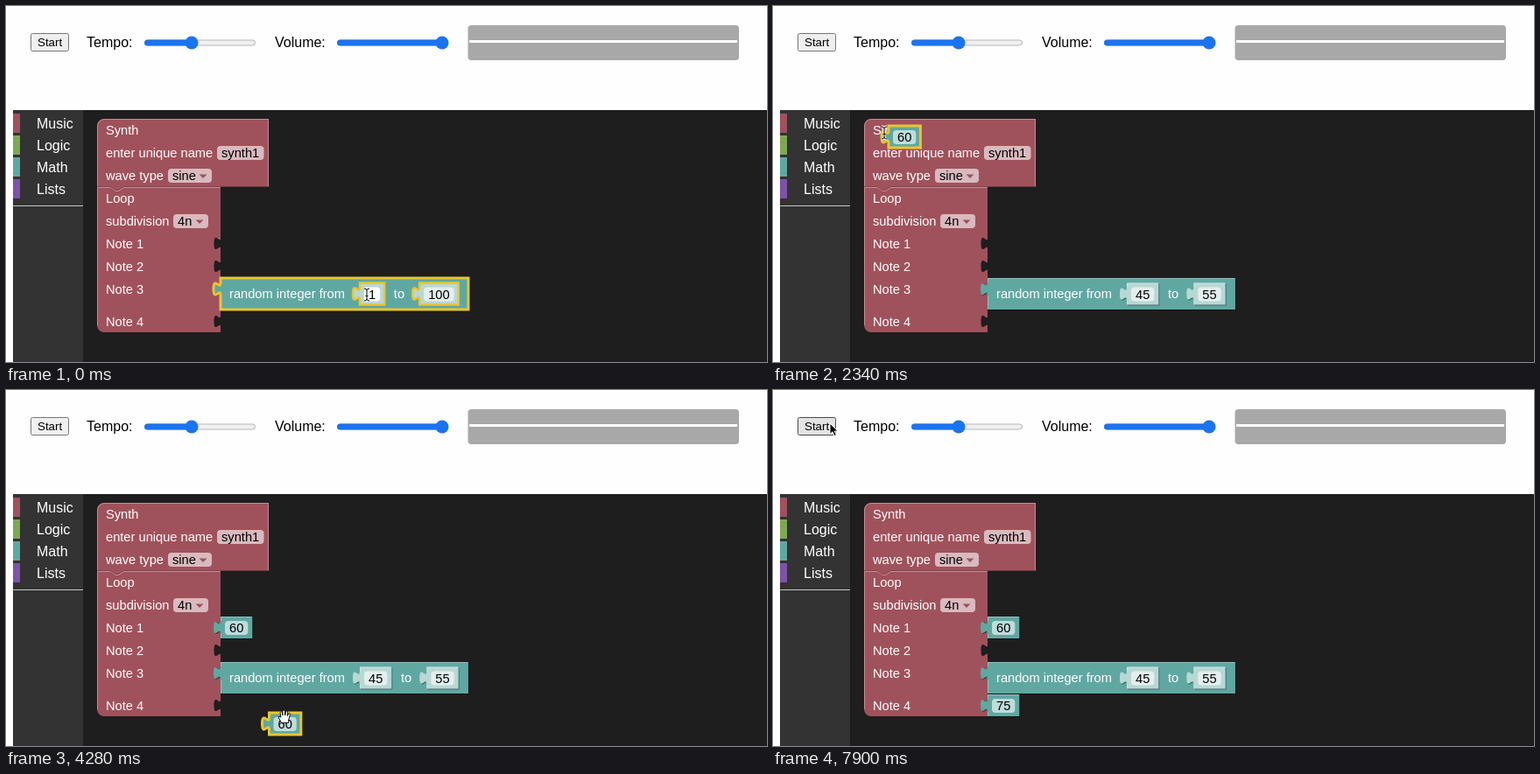
Recreate the animation shown at these times as an HTML page. Size 869 px wide and 407 px high, loop 8000 ms.

```html
<!DOCTYPE html>
<html lang="en">
<head>
<meta charset="utf-8">
<title>Music blocks</title>
<style>
  html, body { margin: 0; width: 100%; height: 100%; overflow: hidden; background: #fefefe; }
  svg { display: block; width: 869px; height: 407px; }
  text { font-family: "Liberation Sans", Arial, sans-serif; white-space: pre; }
</style>
</head>
<body>
<svg id="stage" viewBox="0 0 869 407" xmlns="http://www.w3.org/2000/svg"></svg>
<script>
const LOOP = 8000, TICKS = 82;
const RED = '#a0525c', TEAL = '#5fa8a2', PALE = '#b9d8d5', YELLOW = '#e9c52f';
const DARK = '#1e1e1e', BLUE = '#1a73f0';
const DIGIT = 8.16;
const TAB_DOWN = 'c0,10 -8,-8 -8,7.5 s8,-2.5 8,7.5';
const TAB_UP = 'c0,-10 -8,8 -8,-7.5 s8,2.5 8,-7.5';

// [tick, x, y, kind]
const cursorKeys = [
  [0, 412, 330, 'beam'], [9, 412, 330, 'beam'], [10, 395, 322, 'hand'], [11, 340, 300, 'arrow'],
  [13, 205, 240, 'hand'], [14, 130, 212, 'hand'], [15, 82, 194, 'arrow'], [16, 67, 190, 'arrow'],
  [18, 67, 188, 'arrow'], [20, 120, 160, 'arrow'], [21, 135, 150, 'arrow'],
  [22, 127, 145, 'beam'], [30, 127, 145, 'beam'], [31, 268, 275, 'hand'], [35, 268, 275, 'arrow'],
  [37, 300, 287, 'arrow'], [39, 304, 289, 'arrow'], [41, 312, 340, 'arrow'], [43, 318, 373, 'hand'],
  [45, 318, 373, 'hand'], [48, 298, 349, 'hand'], [50, 276, 329, 'hand'], [51, 271, 341, 'hand'],
  [52, 263, 352, 'hand'], [53, 290, 372, 'arrow'], [54, 312, 378, 'arrow'], [55, 285, 372, 'arrow'],
  [56, 270, 366, 'beam'], [73, 270, 366, 'beam'], [74, 272, 372, 'hand'], [75, 272, 372, 'hand'],
  [76, 295, 338, 'arrow'], [78, 415, 180, 'arrow'], [79, 300, 125, 'arrow'],
  [80, 150, 62, 'arrow'], [81, 65, 38, 'arrow']
];
// [tick, x, y] of the dragged number
const firstDrag = [[23, 104, 129], [25, 160, 145], [27, 305, 215], [28, 336, 238], [29, 300, 246], [30, 253.5, 247]];
const secondDrag = [[45, 300.5, 369], [48, 280, 345], [50, 258, 325], [51, 253, 337]];

function at(keys, n) {
  let i = 0;
  while (i < keys.length - 1 && keys[i + 1][0] <= n) i++;
  const a = keys[i], b = keys[i + 1] || a;
  const p = b === a ? 0 : Math.max(0, (n - a[0]) / (b[0] - a[0]));
  return { x: a[1] + (b[1] - a[1]) * p, y: a[2] + (b[2] - a[2]) * p, kind: a[3] };
}

const rect = (x, y, w, h, fill, extra = '') =>
  `<rect x="${x}" y="${y}" width="${w}" height="${h}" fill="${fill}" ${extra}/>`;
const path = (d, fill, extra = '') => `<path d="${d}" fill="${fill}" ${extra}/>`;
const label = (x, y, s, fill = '#fff', size = 14.67) =>
  `<text x="${x}" y="${y}" font-size="${size}" fill="${fill}">${s}</text>`;

function field(x, y, w, s, opts = {}) {
  let out = rect(x, y, w, 16, '#fff', `rx="4" fill-opacity="${opts.edit ? 1 : 0.6}"`);
  if (opts.select) out += rect(x + 4, y + 1, w - 8, 14, '#b3d4fc');
  out += label(x + 5, y + 13, s, '#000');
  if (opts.caret) out += rect(x + 5.5 + DIGIT * s.length, y + 1, 1, 14, '#000');
  if (opts.arrow) out += path(`M${x + w - 14.5},${y + 6.5} h9 l-4.5,4.5z`, opts.arrow);
  return out;
}

// Block with an output tab on its left side
function valueBlock(x, y, w, h, fill, selected, stroke = 3) {
  const d = `M${x},${y} h${w} v${h} h${-w} V${y + 20} ${TAB_UP} z`;
  if (selected) return path(d, fill, `stroke="${YELLOW}" stroke-width="${stroke}"`);
  return path(d, '#000', 'fill-opacity=".35" transform="translate(1 1)"') + path(d, fill) +
    path(`M${x + .5},${y + h - 1} V${y + 20} m0,-15 V${y + .5} H${x + w - 1}`, 'none', 'stroke="#fff" stroke-opacity=".3"');
}

const numWidth = s => DIGIT * s.length + 20;

function number(x, y, s, { fill = TEAL, selected = false, stroke, ...opts } = {}) {
  const w = numWidth(s);
  return valueBlock(x, y, w, 25, fill, selected, stroke) + field(x + 5, y + 5, w - 10, s, opts);
}

function randomBlock(a, b, selected, editing) {
  const x1 = 404, w1 = numWidth(a), x2 = x1 + w1 + 40;
  const opts = i => ({ fill: PALE, selected, stroke: 2.5, edit: editing === i });
  return valueBlock(245, 311, x2 + numWidth(b) + 11.3 - 245, 36, TEAL, selected) +
    label(255, 334, 'random integer from') +
    number(x1, 316.5, a, opts(1)) + label(x1 + w1 + 10.7, 334, 'to') + number(x2, 316.5, b, opts(2));
}

function slider(x, value) {
  const w = 127;
  return rect(x + .5, 39, w - 1, 6, '#efefef', 'rx="3" stroke="#b8b8b8"') +
    rect(x, 38.5, value, 7, BLUE, 'rx="3.5"') +
    `<circle cx="${x + value}" cy="42" r="7.5" fill="${BLUE}"/>`;
}

function header(hover) {
  return rect(28.5, 31.5, 43, 20, hover ? '#e3e3e3' : '#efefef', `rx="2" stroke="${hover ? '#4a4a4a' : '#767676'}"`) +
    label(36, 46, 'Start', '#000', 13.33) +
    label(92, 47, 'Tempo:', '#000', 16) + slider(158, 54) +
    label(307, 47, 'Volume:', '#000', 16) + slider(378, 120) +
    rect(527.5, 22, 309.5, 40, '#a9a8a9', 'rx="4"') + rect(529, 39, 306, 3, '#fff');
}

function toolbox(hover, open) {
  const rows = [['Music', RED], ['Logic', '#7fa855'], ['Math', TEAL], ['Lists', '#7d54a6']];
  return rect(8, 119, 80, 288, '#333') + rows.map(([name, color], i) => {
    const y = 123 + 25 * i, math = name === 'Math';
    return (math && hover ? rect(8, y, 80, 22, '#575757') : '') +
      rect(8, y, math && open ? 80 : 8, 22, color) + label(35, y + 17, name, '#fff', 16);
  }).join('') + rect(8, 228, 80, 1, '#c4c4c4');
}

function redBlocks() {
  const edge = 'stroke="#fff" stroke-opacity=".35"';
  const notch = 'h15 l6,4 h3 l6,-4';
  let out = path('M104,207 V137 a8,8 0 0 1 8,-8 H300 V207z', RED) +
    path('M104.5,206 V137 a8,8 0 0 1 8,-7.5 H299.5 V206', 'none', edge) +
    path('M245,206.5 H300', 'none', 'stroke="#6f3940"') +
    path('M104,207 H245 V373 H112 a8,8 0 0 1 -8,-8z', RED) +
    path(`M104.5,365 V207.5 ${notch} H244.5`, 'none', edge) +
    path(`M104,206.5 ${notch} H245`, 'none', 'stroke="#6f3940" stroke-opacity=".6"');
  out += label(114, 147, 'Synth') + label(114, 173, 'enter unique name') + field(241, 160, 53.5, 'synth1') +
    label(114, 199, 'wave type') + field(185, 186, 50, 'sine', { arrow: RED }) +
    label(114, 225, 'Loop') + label(114, 251, 'subdivision') + field(191, 238, 40, '4n', { arrow: RED });
  [259, 285, 311, 348].forEach((y, i) => {
    out += label(114, y + 18, 'Note ' + (i + 1)) + path(`M245.5,${y + 5} ${TAB_DOWN} z`, DARK);
  });
  return out;
}

function flyout() {
  const pale = (x, y, s) => number(x, y, s, { fill: PALE });
  const menu = (y, w, fw, s) => valueBlock(104, y, w, 25, TEAL) + field(109, y + 5, fw, s, { arrow: TEAL });
  return rect(88, 119, 348, 288, '#252526') + number(104, 129, '60') +
    valueBlock(104, 187, 134.5, 36, TEAL) + pale(121.5, 192.5, '1') +
    field(155, 197.5, 32, '+', { arrow: TEAL }) + pale(199.5, 192.5, '1') +
    menu(248, 117, 97, 'square root') + pale(221, 248, '9') +
    menu(298, 62, 42, 'sin') + pale(165.5, 298, '45') +
    menu(348, 41.5, 32, 'π') +
    valueBlock(104, 398, 132, 36, TEAL) + pale(121.5, 403.5, '0');
}

// Grey marker and lit socket where a dragged block will land
const preview = y => valueBlock(245, y, numWidth('60'), 25, '#777') +
  path(`M245,${y} v5 ${TAB_DOWN} v5`, 'none', `stroke="${YELLOW}" stroke-width="4"`);

function contextMenu(hover) {
  const items = ['Duplicate', 'Add Comment', 'Collapse Block', 'Disable Block', 'Delete Block'];
  return rect(268, 275, 248, 140, '#fff', 'stroke="#bbb"') +
    (hover ? rect(268.5, 279, 247, 25, '#d6e9f8') : '') +
    items.map((s, i) => label(296, 296 + 25 * i, s, '#000', 13)).join('');
}

function cursor({ x, y, kind }) {
  const move = `transform="translate(${x} ${y})"`;
  if (kind === 'arrow')
    return path('M0,0 V12.5 L3,9.8 L5,14.5 L7.3,13.5 L5.3,9 H9.2z', '#000', `stroke="#fff" ${move}`);
  if (kind === 'beam') {
    const d = 'M-3,-7 Q0,-7 0,-5 Q0,-7 3,-7 M0,-5 V5 M-3,7 Q0,7 0,5 Q0,7 3,7 M-1.5,1.5 H1.5';
    return path(d, 'none', `stroke="#fff" stroke-width="3" ${move}`) + path(d, 'none', `stroke="#000" ${move}`);
  }
  return path('M-3.5,7.5 L-7,1 Q-6.5,-1 -4,1.2 L-5,-4.5 Q-3.6,-6.3 -2.7,-4.5 L-2,-1 V-6 Q-.7,-8 .6,-6 V-1 ' +
    'L1.6,-5.5 Q3.2,-7 3.7,-5 L3.4,-.5 L4.7,-3.2 Q6.6,-4 6.4,-1.8 L4.6,4.5 V7.5z', '#fff', `stroke="#000" stroke-width=".9" ${move}`);
}

function workspace(n) {
  const from = n < 2 ? '1' : n < 3 ? '4' : '45';
  const to = n < 6 ? '100' : n < 7 ? '5' : '55';
  const editing = n < 5 ? 1 : n < 10 ? 2 : 0;
  let out = redBlocks() + randomBlock(from, to, n < 24, editing);
  if (n >= 31) out += number(245, 259, '60', { selected: n < 39 });
  if (n >= 52) {
    const s = n < 67 ? '60' : n < 68 ? '7' : '75';
    out += number(245, 348, s, {
      selected: n < 78, edit: n >= 59 && n < 73, select: n >= 59 && n < 67, caret: n >= 67 && n < 70
    });
  }
  if (n === 30) out += preview(259);
  if (n === 51) out += preview(348);
  if (n >= 17 && n < 24) out += flyout();
  let drag = null;
  if (n >= 24 && n < 31) drag = at(firstDrag, n);
  if (n >= 39 && n < 52) drag = at(secondDrag, n);
  if (drag) out += number(drag.x, drag.y, '60', { selected: true });
  if (n >= 35 && n < 39) out += contextMenu(n >= 37);
  return out;
}

const stage = document.getElementById('stage');
let shown = -1;

function draw(time) {
  // The picture advances in even steps, like the screen recording it imitates
  const n = Math.floor(((time % LOOP) + 20) / LOOP * TICKS) % TICKS;
  if (n === shown) return;
  shown = n;
  const open = n >= 17 && n < 24;
  stage.innerHTML = rect(0, 0, 869, 407, '#fefefe') + header(n === 81) +
    rect(8, 119, 861, 288, DARK) + toolbox(n === 15 || n === 16, open) +
    workspace(n) + cursor(at(cursorKeys, n));
}

let start = null;
function loop(now) {
  if (start === null) start = now;
  draw(now - start);
  requestAnimationFrame(loop);
}
draw(0);
requestAnimationFrame(loop);
</script>
</body>
</html>
```
